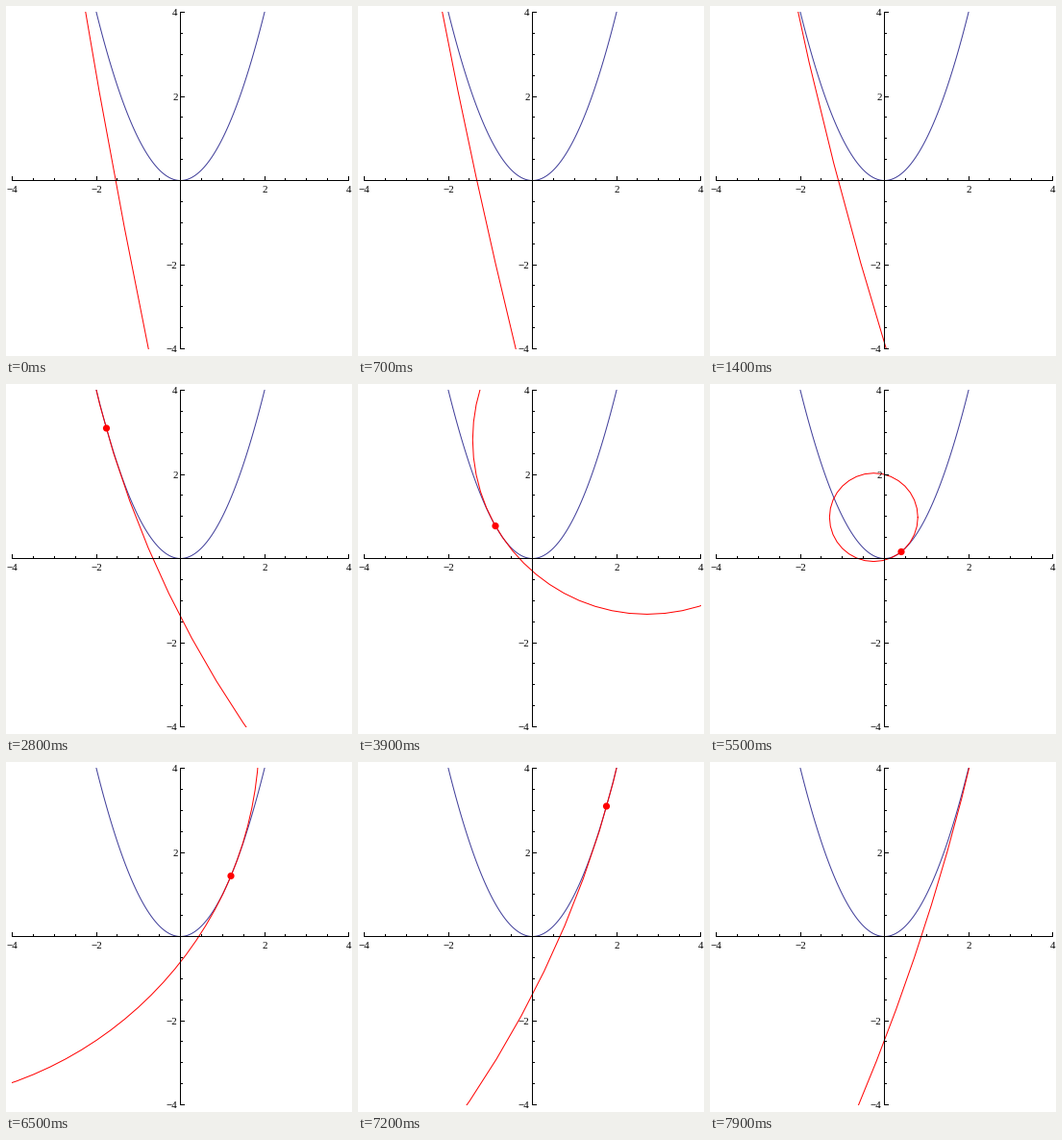
A matplotlib script for the animation above (8000 ms loop, 360 by 364 pixels).

```python
import numpy as np
import matplotlib.pyplot as plt
from matplotlib.animation import FuncAnimation
from matplotlib.patches import Circle, Rectangle

W, H, DPI = 360, 364, 100
PX = 72 / DPI              # points per pixel
ORIGIN, UNIT = 181.5, 43.75
LO, HI = 6, 357            # edges of the plot area
FRAMES, INTERVAL = 80, 100
KAPPA = 4 / 3 * (np.sqrt(2) - 1)
FLATNESS = 0.4             # largest sag of a chord, in pixels

plt.rcParams["path.simplify"] = False
fig = plt.figure(figsize=(W / DPI, H / DPI), dpi=DPI, facecolor="white")
ax = fig.add_axes([0, 0, 1, 1])
ax.set_xlim(0, W)
ax.set_ylim(H, 0)
ax.axis("off")


def to_px(x, y):
    return ORIGIN + UNIT * x, ORIGIN - UNIT * y


def bar(x, y, w, h):
    ax.add_patch(Rectangle((x, y), w, h, fc="black", lw=0,
                           antialiased=False, snap=False, zorder=5))


def label(x, y, value, align):
    text = str(value).replace("-", "\u2212")
    ax.text(x, y, text, ha=align, va="baseline", color="black", zorder=5,
            family="Liberation Serif", fontsize=11 * PX)


def draw_axes():
    mid = int(ORIGIN)
    bar(LO, mid, HI - LO, 1)
    bar(mid, LO, 1, HI - LO)
    for i in range(-8, 9):
        if i == 0:
            continue
        px, py = to_px(i / 2, i / 2)
        major = i % 4 == 0
        size = 4 if major else 2
        bar(int(px), mid - size, 1, size)
        bar(mid + 1, int(py), size, 1)
        if major:
            label(px, 194, i // 2, "center")
            label(178.5, int(py) + 4, i // 2, "right")


def circle_points(cx, cy, r):
    """Circle from four cubic arcs, each halved until its chords are flat."""
    n = 4
    while r * UNIT * (np.pi / 2 / n) ** 2 / 8 > FLATNESS:
        n *= 2
    t = np.arange(n) / n
    s = 1 - t
    u = s**3 + 3 * s**2 * t + 3 * s * t**2 * KAPPA
    v = 3 * s**2 * t * KAPPA + 3 * s * t**2 + t**3
    x = np.concatenate([u, -v, -u, v, u[:1]])
    y = np.concatenate([v, u, -v, -u, v[:1]])
    return to_px(cx + r * x, cy + r * y)


draw_axes()
clip = Rectangle((LO, LO), HI - LO, HI - LO, transform=ax.transData)

xs = np.linspace(-2.1, 2.1, 241)
parabola, = ax.plot(*to_px(xs, xs**2), color=(0.2472, 0.24, 0.6),
                    lw=PX, zorder=2)
ring, = ax.plot([], [], color="red", lw=PX, zorder=3)
dot = ax.add_patch(Circle((0, 0), 3.6, fc="red", lw=0, zorder=4))
for artist in (parabola, ring, dot):
    artist.set_clip_path(clip)


def update(i):
    a = -4 + 0.08 * i
    # centre and radius of curvature of y = x^2 at x = a
    ring.set_data(*circle_points(-4 * a**3, 3 * a**2 + 0.5,
                                 (1 + 4 * a**2) ** 1.5 / 2))
    dot.center = to_px(a, a**2)
    return ring, dot


anim = FuncAnimation(fig, update, frames=FRAMES, interval=INTERVAL,
                     repeat=True, repeat_delay=0)
plt.show()
```
